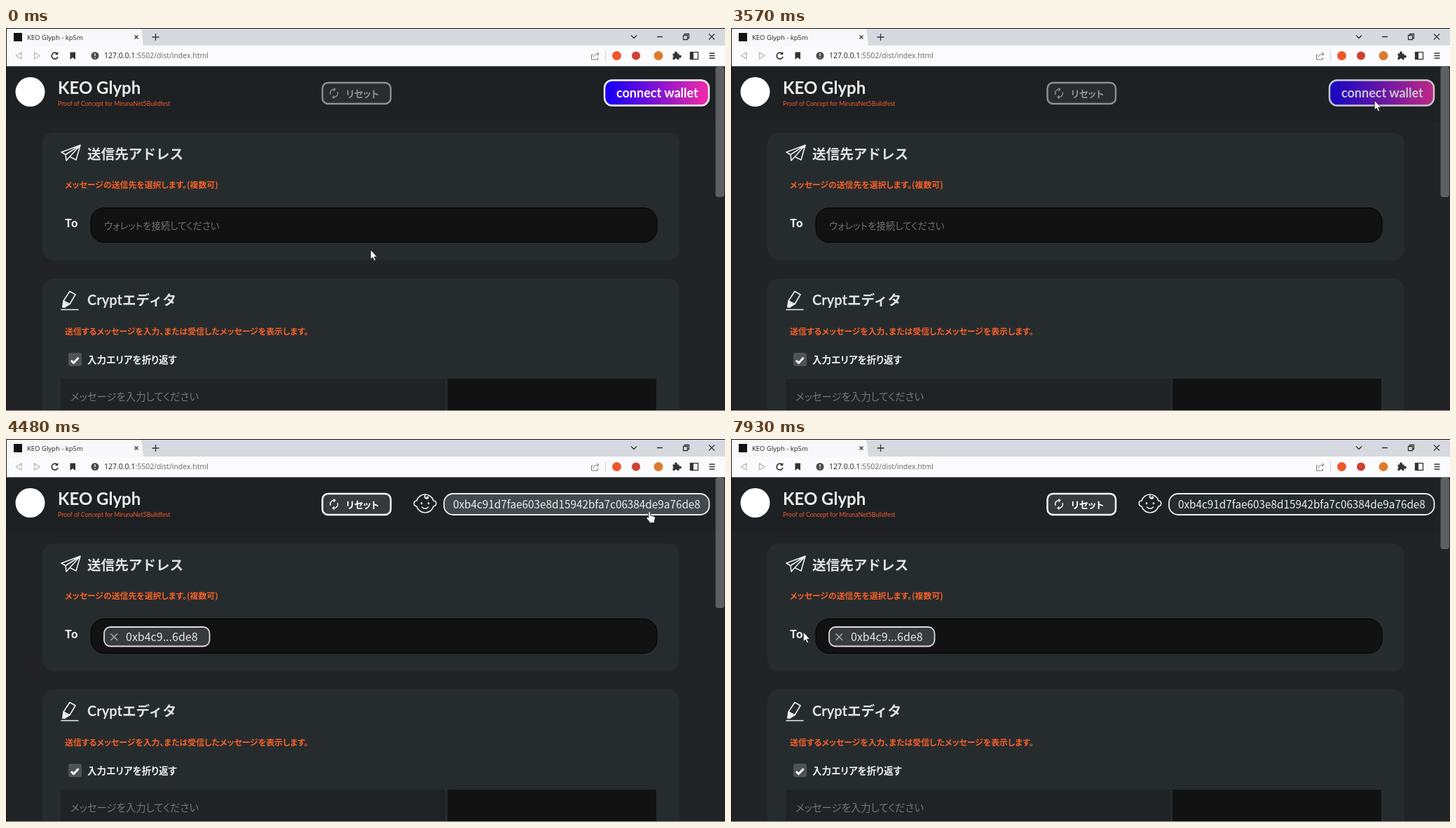
An HTML page that plays this animation: 1026x546 px, repeating every 8 s.

```html
<!DOCTYPE html>
<html lang="ja">
<head>
<meta charset="utf-8">
<title>KEO Glyph - kp5m</title>
<style>
html, body { margin: 0; width: 100%; height: 100%; overflow: hidden; background: #222327; }
svg { display: block; width: 100vw; height: 100vh; }
text { white-space: pre; }
.ui { font-family: "Open Sans", "Noto Sans", sans-serif; }
.geo { font-family: Lato, "Noto Sans CJK JP", sans-serif; font-weight: 700; }
.jp { font-family: "Noto Sans CJK JP", "Noto Sans CJK", "Noto Sans", sans-serif; font-feature-settings: "palt"; }
.head { font-size: 19.6px; font-weight: 700; fill: #e2e2e2; font-feature-settings: normal; }
.note { font-size: 11.9px; font-weight: 700; fill: #fb6028; }
.b { font-weight: 700; }
.m { font-weight: 500; }
.line { fill: none; stroke: #eee; stroke-width: 1.6; stroke-linecap: round; stroke-linejoin: round; }
.dark { fill: none; stroke: #333; stroke-width: 1.3; }
.solid { fill: #333; stroke: none; }
</style>
</head>
<body>
<svg viewBox="0 0 1026 546" preserveAspectRatio="none">
  <defs>
    <linearGradient id="hot"><stop offset=".08" stop-color="#2000f5"/><stop offset="1" stop-color="#f42aa8"/></linearGradient>
  </defs>

  <!-- page -->
  <rect y="54" width="1026" height="492" fill="#222327"/>
  <g fill="#262c2e">
    <rect x="52" y="149" width="909" height="182" rx="16"/>
    <rect x="52" y="357" width="909" height="230" rx="16"/>
  </g>
  <g class="line">
    <path d="M79 177L106 167L100 188L91 183.500L86 189L85 180.500ZM85 180.500L106 167L91 183.500"/>
    <path d="M79 401.500H103M81 397L82 389L91 375.500L99 380L91 393.500L84 397.500ZM82 389L91 393.500"/>
    <path d="M81 398L82.500 391L88 394L84 398Z" fill="#eee"/>
  </g>
  <text class="jp head" x="116" y="187">送信先アドレス</text>
  <text class="jp note" x="84" y="228">メッセージの送信先を選択します。(複数可)</text>
  <text class="jp b" x="84" y="284" font-size="16" fill="#eee">To</text>
  <rect x="121" y="256.500" width="808" height="49" rx="19" fill="#121212" stroke="#000"/>
  <text id="hint" class="jp" x="140" y="287" font-size="13.400" fill="#717171">ウォレットを接続してください</text>
  <g id="chip">
    <rect x="140" y="268" width="150.500" height="27.500" rx="9" fill="#373b3e" stroke="#dedede" stroke-width="1.800"/>
    <path d="M149.500 277.500L159 287M159 277.500L149.500 287" stroke="#a4a4a4" stroke-width="1.700"/>
    <text class="jp m" x="171" y="288" font-size="16" fill="#e8e8e8">0xb4c9...6de8</text>
  </g>
  <text class="geo" x="116" y="395" font-size="20" fill="#e2e2e2">Crypt</text>
  <text class="jp head" x="166" y="395">エディタ</text>
  <text class="jp note" x="84" y="436.500">送信するメッセージを入力、または受信したメッセージを表示します。</text>
  <rect x="89" y="463" width="19" height="19" rx="3" fill="#505356"/>
  <path d="M93 474L96.500 477.500L103.500 470" fill="none" stroke="#fff" stroke-width="2.800"/>
  <text class="jp b" x="116" y="478" font-size="13.600" fill="#eee">入力エリアを折り返す</text>
  <rect x="78" y="500" width="549" height="46" fill="#212226"/>
  <rect x="630" y="500" width="298" height="46" fill="#121212"/>
  <text class="jp" x="92" y="530.500" font-size="14.400" fill="#74767a">メッセージを入力してください</text>

  <!-- loading veil -->
  <g id="veil">
    <rect y="54" width="1012" height="492" fill="#000" opacity=".7"/>
    <circle cx="506.500" cy="237" r="34" fill="none" stroke="#858585" stroke-width="3"/>
    <path id="ring" d="M530.540 212.960A34 34 0 1 1 482.460 212.960" fill="none" stroke="#ececec" stroke-width="3"/>
  </g>

  <!-- page header -->
  <rect id="bar" y="54" width="1012" height="79" fill="#1d2124"/>
  <circle cx="34.500" cy="91" r="21" fill="#fff"/>
  <text class="geo" x="74" y="94" font-size="24" fill="#eee">KEO Glyph</text>
  <text class="geo" x="74" y="110.500" font-size="8.700" style="font-weight:400" fill="#f6592d">Proof of Concept for MirunaNet5Buildfest</text>
  <g id="reset">
    <rect x="451.500" y="78" width="97.500" height="30" rx="8" fill="#37393c" stroke="#fff" stroke-width="2.400"/>
    <path d="M463 95A5.500 5.500 0 0 1 469 87.500M467.500 85.500L469.800 87.600L467.500 89.700M473 91A5.500 5.500 0 0 1 467 98.500M468.500 96.500L466.200 98.400L468.500 100.500" fill="none" stroke="#fff" stroke-width="1.300"/>
    <text class="jp b" x="485" y="98.500" font-size="13.500" fill="#fff">リセット</text>
  </g>
  <g id="connect">
    <rect x="854" y="74.500" width="149" height="36" rx="11" fill="url(#hot)" stroke="#fff" stroke-width="2.400"/>
    <text class="geo" x="871" y="99" font-size="18" fill="#fff">connect wallet</text>
    <rect id="shade" x="852.800" y="73.300" width="151.400" height="38.400" rx="12" fill="#1d2124" opacity=".25"/>
  </g>
  <g id="account">
    <g class="line">
      <path d="M586 88A12.500 12.500 0 0 1 610 88C615 88 615 95.500 610 96A12.500 12.500 0 0 1 586 96C581 95.500 581 88 586 88"/>
      <path d="M598 80C596 84 601 87 602.500 84C603 81.500 600 82 600.500 84M593.500 97C596 100 600 100 602.500 97"/>
      <path d="M593 91.500V92M603 91.500V92" stroke-width="2.600"/>
    </g>
    <rect id="pill" x="625" y="78" width="378.500" height="30" rx="13" fill="#262b2e" stroke="#eee" stroke-width="1.800"/>
    <text class="jp m" x="638" y="98.500" font-size="15.300" fill="#eee">0xb4c91d7fae603e8d15942bfa7c06384de9a76de8</text>
  </g>
  <rect x="1012" y="54" width="14" height="492" fill="#222327"/>
  <rect id="thumb" x="1012.500" y="55" width="12.500" height="186" rx="4" fill="#5e5f62"/>

  <!-- browser frame -->
  <rect width="1026" height="26" fill="#d6d9e0"/>
  <rect y="25" width="1026" height="29.500" fill="#fbfbfd"/>
  <path d="M1 26V4Q1 1 4 1H190Q193 1 194 5L196 26Z" fill="#f8f8fb"/>
  <rect x="11" y="7" width="12" height="12" fill="#141414"/>
  <text class="ui" x="30" y="17" font-size="9.500" fill="#222">KEO Glyph - kp5m</text>
  <g class="dark">
    <path d="M183.500 10.500L188.500 15.500M188.500 10.500L183.500 15.500M208.500 13H218.500M213.500 8V18"/>
    <path d="M892 10.500L896 14.500L900 10.500M929 12.500H937M1003 8.500L1011 16.500M1011 8.500L1003 16.500"/>
    <path d="M966.500 10.500H972.500V16.500H966.500ZM968.500 10V8.500H974.500V14.500H973"/>
    <path d="M22 35V44L14.500 39.500ZM40.500 35V44L48 39.500Z" stroke="#bbb"/>
    <path d="M73.300 37A4.500 4.500 0 1 0 74 41" stroke-width="1.700"/>
    <path class="solid" d="M74.300 33.700V38H70ZM91.500 34.500H99V45L95.200 42L91.500 45Z"/>
    <path d="M837.500 38H835.500V45H844.500V42M838.500 41.500C838.500 38 841 37 845.500 37M843 34.500L846 37L843 39.500" stroke="#777" stroke-width="1"/>
    <path d="M855.500 32V47" stroke="#d3d3d8" stroke-width="1"/>
    <path class="solid" d="M951.500 36.500H954.300A2 2 0 1 1 957.700 36.500H960.500V39A2 2 0 1 1 960.500 42V45H957.800A1.800 1.800 0 0 0 954.200 45H951.500V42A1.700 1.700 0 0 0 951.500 39Z"/>
    <rect x="976.500" y="34.500" width="11" height="10"/>
    <path class="solid" d="M977 35H981V44H977Z"/>
    <path d="M1003.500 36H1011.500M1003.500 39.500H1011.500M1003.500 43H1011.500"/>
  </g>
  <circle cx="127" cy="39.500" r="5.500" fill="#4c4c50"/>
  <path d="M127 36V40M127 41.500V43" stroke="#fff" stroke-width="1.300"/>
  <text class="ui" x="140" y="43.300" font-size="10.500" fill="#222">127.0.0.1<tspan fill="#666">:5502/dist/index.html</tspan></text>
  <circle cx="871.500" cy="39.500" r="6.500" fill="#f1562b"/>
  <circle cx="899" cy="39.500" r="6" fill="#cf3f34"/>
  <circle cx="931" cy="39.500" r="6.500" fill="#de7a2c"/>
  <path d="M.5 546V.5H1026" fill="none" stroke="#111"/>
  <path d="M0 545.500H1026" stroke="#a3a5a9"/>

  <g id="pointer">
    <path id="arrow" d="M.3 .3V13.800L3.300 11L5.500 15.700L7.600 14.800L5.500 10.200H9.500Z" fill="#fff" stroke="#111" stroke-width=".7"/>
    <path id="hand" d="M-1.200 8.500V1.300Q0 -.6 1.400 1.300V6L7 7.200Q8.500 7.800 8.300 9.500L7.300 14V16.500H-.2V14.500L-4 10.200Q-4 8 -2.500 8.300L-1.200 9.500Z" fill="#fff" stroke="#111" stroke-width=".8"/>
  </g>
</svg>
<script>
const LOOP = 8000, STEP = 70; // the screen refreshes in 70 ms steps

const $ = id => document.getElementById(id);
const show = (id, on) => $(id).style.display = on ? "" : "none";
const paint = (id, name, value) => $(id).setAttribute(name, value);
const unit = k => Math.min(1, Math.max(0, k));
const mix = (a, b, k) => a + (b - a) * k;

function glide(a, b, k) {
  k = unit(k);
  k *= k * (3 - 2 * k);
  return { x: mix(a.x, b.x, k), y: mix(a.y, b.y, k) };
}

// circle c.x, c.y with radii rx, ry; from and to count clockwise turns
function orbit(c, rx, ry, from, to, k) {
  const angle = 2 * Math.PI * mix(from, to, unit(k));
  return { x: c.x + rx * Math.cos(angle), y: c.y + ry * Math.sin(angle) };
}

const home = { x: 520, y: 316 };
const button = { x: 892, y: 128 }, entry = { x: 955, y: 128 }, press = { x: 918, y: 103 };
const address = { x: 873, y: 108 }, below = { x: 873, y: 155 }, above = { x: 839, y: 74 };
const rest = { x: 212, y: 333 }, label = { x: 103, y: 275 };

function place(t) {
  if (t < 990) return glide(home, entry, (t - 530) / 460);
  if (t < 2000) return orbit(button, 63, 66, 0, 1.537, (t - 1190) / 770);
  if (t < 2800) return orbit(button, 63, 55, 1.537, 3, (t - 1960) / 830);
  if (t < 4690) return glide(entry, press, (t - 2800) / 490);
  if (t < 5110) return glide(press, below, (t - 4690) / 350);
  if (t < 6720) return orbit(address, 50, 47, .25, 2.63, (t - 5110) / 1540);
  if (t < 7700) return glide(above, rest, (t - 6720) / 880);
  return glide(rest, label, (t - 7700) / 210);
}

function draw(now) {
  const t = Math.floor(now / STEP + .001) * STEP;
  const { x, y } = place(t);
  const inside = (l, top, r, b) => x >= l && x <= r && y >= top && y <= b;
  const linked = t >= 3850, ready = t >= 4480, busy = t >= 3640 && !ready;
  const over = linked && inside(625, 77, 1004, 109);
  const hand = over && t < 4740;

  show("connect", !linked);
  show("account", linked);
  show("shade", inside(853, 73, 1004, 111));
  show("chip", ready);
  show("hint", !ready);
  show("veil", busy);
  show("hand", hand);
  show("arrow", !hand);
  paint("bar", "fill", busy ? "#212327" : "#1d2124");
  paint("pill", "fill", over ? "#43494d" : "#262b2e");
  paint("reset", "opacity", ready ? 1 : .5);
  paint("thumb", "height", t < 4740 ? 186 : 102);
  paint("ring", "transform", `rotate(${(t - 4340) * .36 - 15} 506.5 237)`);
  paint("pointer", "transform", `translate(${Math.round(x)} ${Math.round(y)})`);
}

const start = performance.now();
(function frame() {
  draw((performance.now() - start) % LOOP);
  requestAnimationFrame(frame);
})();
</script>
</body>
</html>
```
